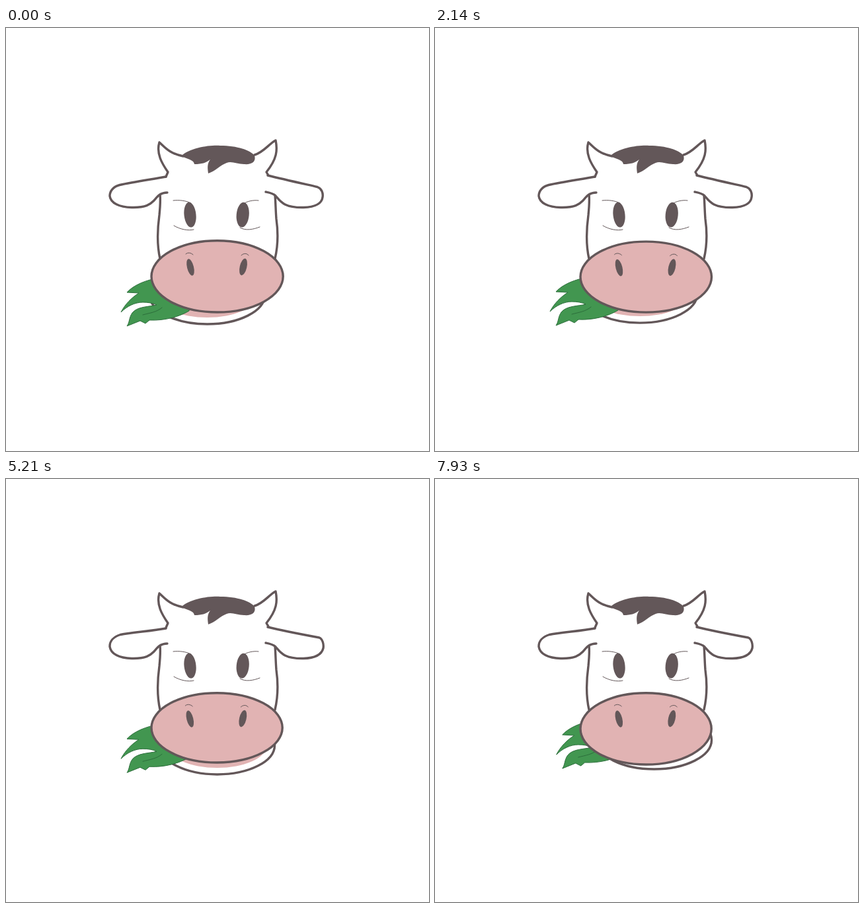
Recreate the animation shown at these times as an HTML page. Size 640 by 640 pixels, loop 8000 ms.

```html
<!DOCTYPE html>
<html lang="en">
<head>
<meta charset="utf-8">
<title>Chewing cow</title>
<style>
  html, body { margin: 0; width: 100%; height: 100%; overflow: hidden; background: #fff; }
  svg { display: block; width: 100%; height: 100%; }
  .line { stroke: #635759; stroke-width: 3.4; stroke-linecap: round; stroke-linejoin: round; }
  .thin { fill: none; stroke: #635759; stroke-width: 1; stroke-linecap: round; }
  .dark { fill: #635759; }
  .white { fill: #fff; }
  .open { fill: none; }
  .pink { fill: #e1b3b3; }
  .leaf { fill: #429650; stroke: #2c6e3b; stroke-width: 1; stroke-linejoin: round; }
</style>
</head>
<body>
<svg viewBox="0 0 640 640">
  <defs>
    <ellipse id="eyeL" cx="278.5" cy="282.6" rx="9" ry="19" transform="rotate(-6 278.5 282.6)"/>
    <ellipse id="eyeR" cx="358.2" cy="282.6" rx="9.5" ry="19" transform="rotate(5 358.2 282.6)"/>
    <clipPath id="eyes"><use href="#eyeL"/><use href="#eyeR"/></clipPath>
  </defs>

  <ellipse id="jaw" class="line white" ry="44"/>
  <ellipse id="mouth" class="pink" rx="75" ry="34"/>

  <g id="grass">
    <path class="leaf" d="M232 378C212 381 193 389 183 400L201 401C190 408 180 418 174 430
      C183 421 195 415 207 415C215 415 222 416 228 419C216 422 199 421 191 431
      C186 438 187 446 183 451L203 443L211 447L217 442C240 443 262 437 277 428L282 400Z"/>
    <path class="thin" style="stroke:#2c6e3b" d="M207 434C218 431 228 430 236 423"/>
  </g>

  <path class="white" d="M233 250L245 222L268 194L376 192L396 222L408 252L411 320L407 349L320 400L233 349Z"/>
  <path class="line open" d="M233 252C234 262 233 273 232 283C229 305 228 327 233 349
    M407 253C408 265 408 277 409 289C412 310 411 332 407 349"/>
  <path id="earL" class="line white"/>
  <path id="earR" class="line white"/>
  <path class="line white" d="M242 225L245 218C236 205 227 190 232 173C240 180 247 190 268 194"/>
  <path class="line white" d="M376 192C390 188 398 175 408 170C411 185 410 198 394 218L397 223"/>
  <path class="dark" d="M265 194C278 181 308 177 324 178C350 178 370 185 376 193
    C379 203 371 207 360 206C350 206 341 201 334 204C325 207 316 217 306 220
    C305 212 304 206 309 199C302 204 297 206 285 206C284 200 278 199 265 194Z"/>

  <g class="dark"><use href="#eyeL"/><use href="#eyeR"/></g>
  <g id="shine" class="white" clip-path="url(#eyes)">
    <ellipse cx="281" cy="272" rx="15" ry="18"/>
    <ellipse cx="356" cy="272" rx="15" ry="18"/>
  </g>
  <path class="thin" d="M253 261C262 260 272 261 280 265M359 266C365 262 374 260 382 261
    M254 299C264 305 276 307 284 305M354 302C362 307 374 305 384 301"/>

  <ellipse id="muzzle" class="line pink"/>
  <g id="nose">
    <ellipse class="dark" cx="279" cy="362" rx="5" ry="13" transform="rotate(-14 279 362)"/>
    <ellipse class="dark" cx="359" cy="361.5" rx="5.3" ry="13" transform="rotate(13 359 361.5)"/>
    <path class="thin" d="M272 342C275 339 280 340 283 343M356 344C359 341 364 340 367 344"/>
  </g>
</svg>
<script>
const LOOP = 8000;
const $ = id => document.getElementById(id);
const linear = p => p;
const smooth = p => (1 - Math.cos(Math.PI * p)) / 2;

// Each track holds [seconds, value] keys.
const jawX = [[0, 304.5], [1.5, 308], [2.86, 312], [4, 316], [5.21, 319.5], [6.07, 327.5], [7.93, 331.5]];
const jawBottom = [[0, 448], [.4, 451], [1.5, 431], [2.6, 455], [3.65, 431], [4.72, 453], [5.75, 440], [6.86, 455], [7.93, 439]];
const grassX = [[5.3, 0], [6.07, 3], [6.86, 8], [7.93, 9.7]];
const grassY = [[0, 0], [.3, 1], [1.5, -11], [2.55, 4], [3.8, -16], [4.65, 1], [5.75, -14], [6.86, 3], [7.93, -13]];
const muzzleTop = [[0, 321.7], [1.5, 322.2], [2.6, 323.7]];
const muzzleBottom = [[0, 430], [1.5, 428.5], [2.86, 432], [4, 428.3], [5.21, 429], [6.07, 430.3], [7.93, 432]];
const earShift = [[4.3, 0], [5.2, 1]];
const shine = [[3.6, 0], [4, .21], [4.4, 0]];

function at(keys, t, ease = smooth) {
  if (t <= keys[0][0]) return keys[0][1];
  for (let i = 1; i < keys.length; i++) {
    const [t0, a] = keys[i - 1], [t1, b] = keys[i];
    if (t < t1) return a + (b - a) * ease((t - t0) / (t1 - t0));
  }
  return keys[keys.length - 1][1];
}

function set(id, attributes) {
  for (const name in attributes) $(id).setAttribute(name, attributes[name]);
}

function draw(t) {
  const x = at(jawX, t, linear), bottom = at(jawBottom, t);
  set('jaw', { cx: x, cy: bottom - 44, rx: 87 });
  set('mouth', { cx: x, cy: bottom - 44 });
  set('grass', { transform: `translate(${at(grassX, t, linear)} ${at(grassY, t)})` });

  const top = at(muzzleTop, t), low = at(muzzleBottom, t), drift = (top - 321.7) / 2;
  set('muzzle', { cx: 319.6 - drift / 2, cy: (top + low) / 2, rx: 99.6 - drift / 2, ry: (low - top) / 2 });
  set('nose', { transform: `translate(${-drift * .7} ${drift})` });
  set('shine', { opacity: at(shine, t, linear) });

  const e = at(earShift, t);
  set('earL', { d: `M242 ${225 + e}C220 ${229 + e} 192 ${233 - e} ${172 + e} ${237.5 - e * 2}
    C162 ${240 - e} 157 ${247 - e} 157 ${254 - e}C158 265 172 271 190 271.5C212 272 218 267 224 261
    C229 255 233 249 244 249` });
  set('earR', { d: `M396 ${223 + e}C420 ${229 + e} 447 235 ${471 + e * 3} ${240.5 - e * .5}
    C${478 + e} ${243 - e} ${480 + e} 250 ${479 + e} 256C478 264 470 271 450 271.5
    C420 272 415 262 408 254C404 250 398 249 393 248` });
}

const start = performance.now();
function frame() {
  draw((performance.now() - start) % LOOP / 1000);
  requestAnimationFrame(frame);
}
frame();
</script>
</body>
</html>
```
